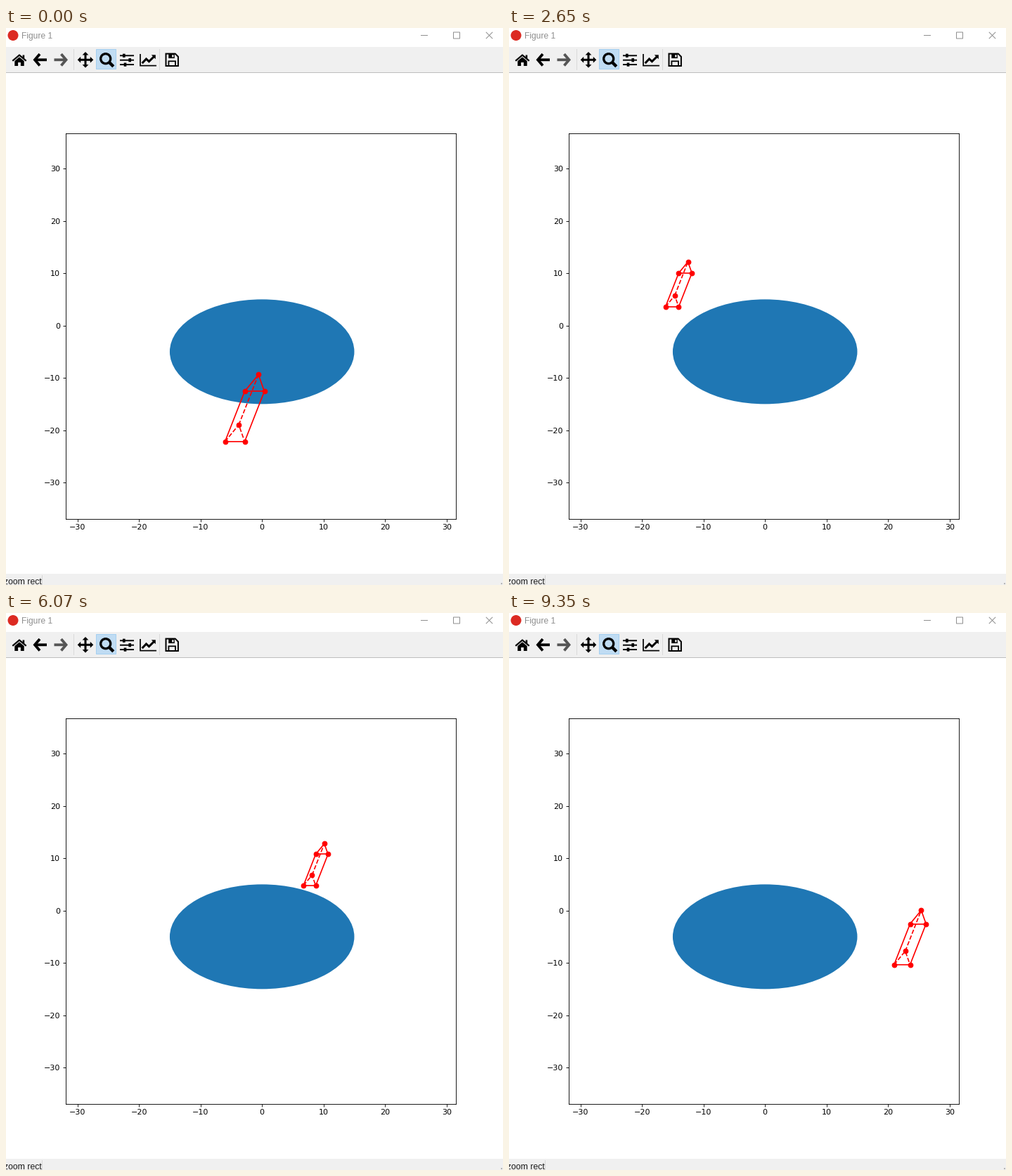
Write a matplotlib script that moves like this. It is 707 px wide and 793 px high and loops after 9420 ms.

```python
import numpy as np
import matplotlib.pyplot as plt
from matplotlib.animation import FuncAnimation
from matplotlib.patches import Circle, Ellipse, Polygon, Rectangle

W, H, DPI = 707, 793, 80
LOOP, TICK = 9420, 30
PX = 72 / DPI  # points per pixel
INK, PANEL, GREY = "black", "#f0f0f0", "#8f8f8f"

plt.rcParams["toolbar"] = "None"
fig = plt.figure(figsize=(W / DPI, H / DPI), dpi=DPI, facecolor="white")

# ---- window frame, drawn in pixels from the top left ----
win = fig.add_axes([0, 0, 1, 1])
win.set_xlim(0, W)
win.set_ylim(H, 0)
win.axis("off")


def rect(x, y, w, h, color=INK, edge="none", width=1):
    win.add_patch(Rectangle((x, y), w, h, facecolor=color, edgecolor=edge,
                            linewidth=width * PX, snap=False))


def disc(x, y, r, color=INK, edge="none", width=1):
    win.add_patch(Circle((x, y), r, facecolor=color, edgecolor=edge,
                         linewidth=width * PX))


def poly(points, color=INK):
    win.add_patch(Polygon(points, closed=True, facecolor=color,
                          edgecolor="none", snap=False))


def stroke(points, width, color=INK):
    xs, ys = zip(*points)
    win.plot(xs, ys, color=color, linewidth=width * PX, snap=False,
             solid_capstyle="butt", solid_joinstyle="miter")


def label(x, y, text, size, color):
    win.text(x, y, text, family="Liberation Sans", fontsize=size * PX,
             color=color, va="baseline", ha="left")


def title_bar():
    disc(10, 10.5, 7.5, "#dc2a22")
    label(22, 15, "Figure 1", 12, GREY)
    x, y, r = 687.5, 10.5, 4.7
    stroke([(590, y), (600, y)], 1, GREY)
    rect(636.5, y - 4.5, 9, 9, "none", GREY)
    for way in (1, -1):
        stroke([(x - r, y - way * r), (x + r, y + way * r)], 1, GREY)


def home(x, y):
    stroke([(x - 9.7, y + 0.8), (x, y - 7.4), (x + 9.7, y + 0.8)], 2.2)
    rect(x + 4.6, y - 7.5, 2.6, 5.5)
    poly([(x - 6.7, y + 1), (x, y - 4.6), (x + 6.7, y + 1)])
    rect(x - 6.7, y + 1, 13.4, 7)
    rect(x - 1.9, y + 3, 3.8, 5.2, PANEL)


def arrow(x, y, way, color):
    tip = (x + 8 * way, y)
    stroke([(x + way, y - 8.2), tip, (x + way, y + 8.2)], 3.8, color)
    stroke([(x - 9 * way, y), tip], 3.8, color)


def move(x, y):
    for dx, dy in [(1, 0), (-1, 0), (0, 1), (0, -1)]:
        stroke([(x, y), (x + 8 * dx, y + 8 * dy)], 3)
        poly([(x + 11.3 * dx, y + 11.3 * dy),
              (x + 6.8 * dx + 4.4 * dy, y + 6.8 * dy + 4.4 * dx),
              (x + 6.8 * dx - 4.4 * dy, y + 6.8 * dy - 4.4 * dx)])


def magnifier(x, y):
    rect(x - 14.5, y - 15, 28, 28, "#c0dcf3", "#a5cff0")
    disc(x - 1.3, y - 1.8, 7, "none", INK, 3.3)
    stroke([(x + 3.3, y + 2.8), (x + 9.8, y + 9.3)], 4.4)


def sliders(x, y):
    for row, knob in [(-1, -4.2), (0, 4.2), (1, -2.5)]:
        cy = y + 6.4 * row
        stroke([(x - 10, cy), (x + 10, cy)], 1.9)
        rect(x + knob - 2.7, cy - 2.6, 5.4, 5.2, PANEL)
        rect(x + knob - 1.8, cy - 2.6, 3.6, 5.2)


def chart(x, y):
    stroke([(x - 11, y - 8), (x - 11, y + 8.6), (x + 12, y + 8.6)], 1.7)
    stroke([(x - 8.4, y + 5.2), (x - 2.5, y - 1), (x + 1.4, y + 2.7),
            (x + 8.5, y - 4.3)], 3)
    poly([(x + 4.8, y - 6.7), (x + 10.8, y - 6.7), (x + 10.8, y - 0.7)])


def floppy(x, y):
    r = 8.7
    stroke([(x, y - r), (x - r, y - r), (x - r, y + r), (x + r, y + r),
            (x + r, y - 4.5), (x + 4.5, y - r), (x, y - r)], 2)
    rect(x - 5, y - r, 8.6, 6.5)
    rect(x, y - 7, 2.3, 3.2, PANEL)
    rect(x - 4.8, y + 2, 9.6, 6.7, "none", INK, 1.8)


def toolbar(y=45.3):
    rect(0, 27, W, 36, PANEL)
    rect(0, 63, W, 1, "#bdbdbd")
    for x in (96, 218):
        rect(x, 30, 1, 30, "#d9d9d9")
    home(19, y + 0.7)
    arrow(49, y, -1, INK)
    arrow(77.5, y, 1, "#555555")
    move(113, y)
    magnifier(143, y + 0.2)
    sliders(172, y + 0.4)
    chart(202, y - 0.3)
    floppy(236.2, y)


def status_bar():
    rect(0, 777, W, 16, PANEL)
    label(-3, 792, "zoom rect", 12.3, "#1a1a1a")
    rect(51, 779, 1, 14, "#d7d7d7")
    rect(704, 790, 2, 2, "#b5b5b5")


title_bar()
toolbar()
status_bar()

# ---- plot ----
LEFT, RIGHT, TOP, BOTTOM = 85.1, 640, 149.6, 698.6
X0, Y0, X_UNIT, Y_UNIT = 364.2, 423.6, 8.75, 7.45

ax = fig.add_axes([LEFT / W, 1 - BOTTOM / H, (RIGHT - LEFT) / W, (BOTTOM - TOP) / H])
ax.set_xlim((LEFT - X0) / X_UNIT, (RIGHT - X0) / X_UNIT)
ax.set_ylim((Y0 - BOTTOM) / Y_UNIT, (Y0 - TOP) / Y_UNIT)
ax.set_xticks(range(-30, 31, 10))
ax.set_yticks(range(-30, 31, 10))
ax.add_patch(Ellipse((0, -5), 30, 20, facecolor="C0", edgecolor="none", zorder=1))

# Prism corners: lower left, lower right, lower back, then the upper three.
BASE = np.array([(0, 0), (1, 0), (0.7, 1)])
PRISM = np.vstack([BASE, BASE + (1, 3)])
PATHS = [([0, 1, 4, 5, 3, 0], "r-"), ([3, 4], "r-"),
         ([0, 2, 1], "r--"), ([2, 5], "r--"), (range(6), "ro")]
edges = [(list(order), ax.plot([], [], style, zorder=3)[0]) for order, style in PATHS]

# ---- motion: hard steps that land on a coarse 78 ms clock ----
STEP = 0.3
steps = np.arange(47)
starts = 77.9 * np.ceil(2.595 * steps + 0.14) - 10
starts[0] = 0

# The prism shrinks on the way back and grows on the way forward.
change = -0.15 * np.sign(np.sin(STEP * steps + 0.275))
sizes = 3.2 + np.cumsum(change) - change


def corners(step):
    angle = 4.653 + STEP * step
    angle += 0.03 * np.sin(angle)
    orbit = np.array([9.88 * np.cos(angle) - 1, 4.92 * np.sin(angle) - 2.03])
    return sizes[step] * (PRISM + orbit)


def update(frame):
    now = frame * TICK + 20
    step = np.searchsorted(starts, now, side="right") - 1
    points = corners(step)
    for order, line in edges:
        line.set_data(points[order, 0], points[order, 1])
    return [line for _, line in edges]


anim = FuncAnimation(fig, update, frames=LOOP // TICK, interval=TICK,
                     blit=False, repeat=True)
plt.show()
```
